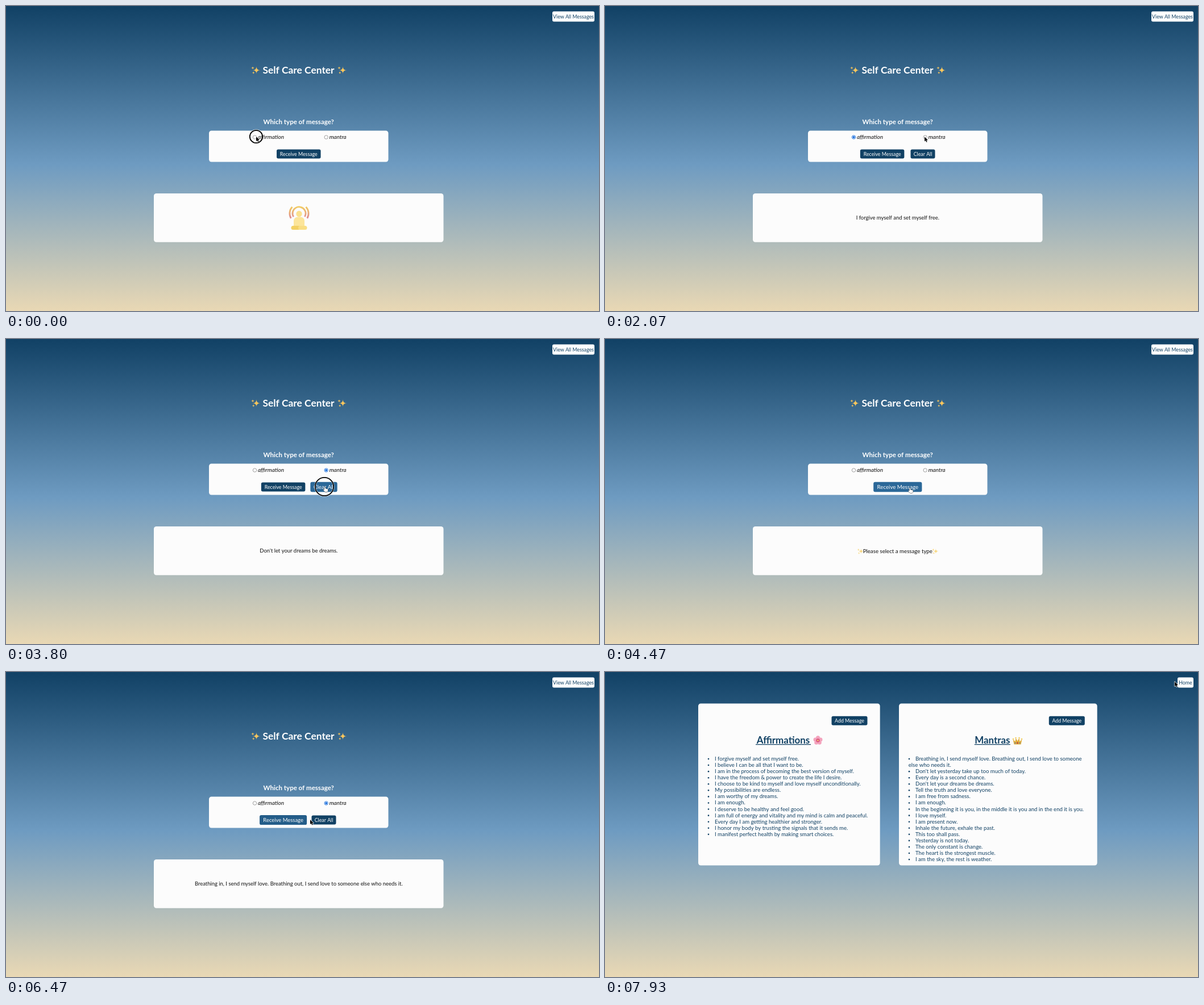
These frames come from a looping animation (1043 by 537 pixels, 8000 ms). An HTML page with a canvas:

```html
<!DOCTYPE html>
<html lang="en">
<head>
<meta charset="utf-8">
<title>Self Care Center</title>
<style>
  html, body { margin: 0; width: 100%; height: 100%; overflow: hidden; }
  body { background: linear-gradient(#114165, #6e9bc1 52%, #e9d8b4); }
  canvas { display: block; }
</style>
</head>
<body>
<canvas id="stage" width="1043" height="537"></canvas>
<script>
const ctx = document.getElementById('stage').getContext('2d');
const LOOP = 8000, LISTS_AT = 7870;
const NAVY = [17, 65, 100], BLUE = [43, 104, 152], WHITE = [255, 255, 255], CREAM = [250, 244, 231];
const LINK = [58, 120, 162], CARD = '#fcfcfc', INK = '#111';

// [time, x, y] of the pointer tip
const path = [
  [0, 440, 230], [270, 440, 230], [560, 484, 258], [1650, 484, 258], [2100, 563, 230],
  [2330, 563, 230], [2900, 519, 258], [3270, 519, 258], [3700, 560, 260], [4130, 560, 260],
  [4300, 535.5, 262], [4930, 535.5, 262], [5500, 563, 230], [5730, 563, 230],
  [6050, 535, 260], [6480, 535, 260], [7330, 1002, 17]
];
// [start, end, ring radius]
const clicks = [
  [0, 70, 12], [600, 670, 17], [1000, 1130, 17], [1530, 1600, 17], [2130, 2230, 12], [3000, 3070, 17],
  [3800, 3870, 17], [4330, 4400, 17], [5670, 5730, 12], [6330, 6400, 17], [7670, 7870, 17]
];
const hovers = {
  receive: [[480, 1740], [2720, 3430], [4200, 5060], [5900, 6400]],
  clear: [[3500, 3870]],
  view: [[7270, LISTS_AT]]
};
const ICON = 'icon', PROMPT = 'Please select a message type';
const messages = [
  [0, ICON], [670, 'I am in the process of becoming the best version of myself.'],
  [1070, 'My possibilities are endless.'], [1600, 'I forgive myself and set myself free.'],
  [3070, "Don't let your dreams be dreams."], [3870, ICON], [4400, PROMPT],
  [6400, 'Breathing in, I send myself love. Breathing out, I send love to someone else who needs it.']
];
const choices = [[0, ''], [70, 'affirmation'], [2230, 'mantra'], [3870, ''], [5730, 'mantra']];

const affirmations = [
  'I forgive myself and set myself free.', 'I believe I can be all that I want to be.',
  'I am in the process of becoming the best version of myself.',
  'I have the freedom & power to create the life I desire.',
  'I choose to be kind to myself and love myself unconditionally.',
  'My possibilities are endless.', 'I am worthy of my dreams.', 'I am enough.',
  'I deserve to be healthy and feel good.',
  'I am full of energy and vitality and my mind is calm and peaceful.',
  'Every day I am getting healthier and stronger.',
  'I honor my body by trusting the signals that it sends me.',
  'I manifest perfect health by making smart choices.'
];
const mantras = [
  'Breathing in, I send myself love. Breathing out, I send love to someone\nelse who needs it.',
  "Don't let yesterday take up too much of today.", 'Every day is a second chance.',
  "Don't let your dreams be dreams.", 'Tell the truth and love everyone.',
  'I am free from sadness.', 'I am enough.',
  'In the beginning it is you, in the middle it is you and in the end it is you.',
  'I love myself.', 'I am present now.', 'Inhale the future, exhale the past.',
  'This too shall pass.', 'Yesterday is not today.', 'The only constant is change.',
  'The heart is the strongest muscle.', 'I am the sky, the rest is weather.'
];

const clamp = v => Math.max(0, Math.min(1, v));
const ease = v => v * v * (3 - 2 * v);
const mix = (a, b, k) => `rgb(${a.map((v, i) => Math.round(v + (b[i] - v) * k))})`;
const latest = (list, t) => list.filter(e => e[0] <= t).pop()[1];

function pointer(t) {
  const i = path.findIndex(p => p[0] > t);
  if (i < 0) return path[path.length - 1].slice(1);
  const [t0, x0, y0] = path[i - 1], [t1, x1, y1] = path[i];
  const k = ease((t - t0) / (t1 - t0));
  return [x0 + (x1 - x0) * k, y0 + (y1 - y0) * k];
}

const hoverAmount = (name, t) => Math.max(...hovers[name].map(([on, off]) =>
  t < off ? clamp((t - on) / 250) : clamp(1 - (t - off) / 250)));
const isHovering = t => Object.values(hovers).flat().some(([on, off]) => t >= on && t < off);

function text(str, x, y, size, color = INK, style = '', align = 'center') {
  ctx.font = `${style} ${size}px Lato, sans-serif`;
  ctx.textAlign = align;
  ctx.fillStyle = color;
  ctx.fillText(str, x, y);
}

function box(x, y, w, h, r, color) {
  ctx.fillStyle = color;
  ctx.beginPath();
  ctx.roundRect(x, y, w, h, r);
  ctx.fill();
}

function disc(x, y, rx, ry, color) {
  ctx.fillStyle = color;
  ctx.beginPath();
  ctx.ellipse(x, y, rx, ry, 0, 0, 7);
  ctx.fill();
}

function circle(x, y, r, color, width) {
  ctx.strokeStyle = color;
  ctx.lineWidth = width;
  ctx.beginPath();
  ctx.arc(x, y, r, 0, 7);
  ctx.stroke();
}

function button(label, cx, cy, w, h, bg, fg, hover = 0) {
  ctx.save();
  ctx.translate(cx, cy);
  ctx.scale(1 + hover * 0.1, 1 + hover * 0.1);
  box(-w / 2, -h / 2, w, h, 2.7, bg);
  text(label, 0, 3.1, 8.8, fg);
  ctx.restore();
}

const navyButton = (label, cx, cy, w, hover = 0) =>
  button(label, cx, cy, w, 16, mix(NAVY, BLUE, hover), '#fff', hover);

function star(x, y, r, color) {
  ctx.fillStyle = color;
  ctx.beginPath();
  ctx.moveTo(x, y - r);
  for (let i = 1; i <= 4; i++) {
    const a = i * Math.PI / 2;
    ctx.quadraticCurveTo(x, y, x + r * Math.sin(a), y - r * Math.cos(a));
  }
  ctx.fill();
}

function sparkles(x, y, s, color) {
  star(x + 2 * s, y, 6.6 * s, color);
  star(x - 4.5 * s, y - 4 * s, 3.2 * s, color);
  star(x - 3.3 * s, y + 4.6 * s, 2.8 * s, color);
}

function radio(label, x, checked) {
  disc(x, 231, 3.5, 3.5, '#fff');
  circle(x, 231, 3.2, checked ? '#1b6fdc' : '#767676', checked ? 0.9 : 0.7);
  if (checked) disc(x, 231, 2, 2, '#1b6fdc');
  text(label, x + 5.5, 234, 10, INK, 'italic', 'left');
}

function meditator() {
  const glow = ctx.createLinearGradient(0, 352, 0, 375);
  glow.addColorStop(0, '#f2cf62');
  glow.addColorStop(0.4, '#ecb673');
  glow.addColorStop(1, '#dc8497');
  ctx.strokeStyle = glow;
  ctx.lineWidth = 2.8;
  for (const [r, from, to] of [[11.5, 2.6, 6.82], [16.6, 2.6, 3.9], [16.6, 5.52, 6.82]]) {
    ctx.beginPath();
    ctx.arc(515.5, 365.2, r, from, to);
    ctx.stroke();
  }
  disc(515.5, 366, 5.2, 5.4, '#fbe28e');
  box(506, 371.5, 19, 18, [7, 7, 2, 2], '#fce59a');
  box(501.5, 387, 16, 7, 3.5, '#f3d164');
  box(514, 387, 15.5, 7, 3.5, '#f9de84');
}

function homePage(t) {
  const view = hoverAmount('view', t), message = latest(messages, t);
  button('View All Messages', 998, 18.5, 74, 18, mix(WHITE, CREAM, view), mix(NAVY, LINK, view), view);
  text('Self Care Center', 514.5, 118.5, 17.4, '#fff', 'bold');
  sparkles(438.5, 113, 1, '#f9c65c');
  sparkles(590.5, 113, 1, '#f9c65c');
  text('Which type of message?', 514.7, 207.6, 11.5, '#fff', 'bold');

  box(357, 219.5, 315.5, 55, 4.5, CARD);
  const choice = latest(choices, t);
  radio('affirmation', 437.5, choice === 'affirmation');
  radio('mantra', 563.2, choice === 'mantra');
  const clearable = message !== ICON && message !== PROMPT;
  navyButton('Receive Message', clearable ? 487.6 : 514.8, 260.5, 77.5, hoverAmount('receive', t));
  if (clearable) navyButton('Clear All', 559, 260.5, 43, hoverAmount('clear', t));

  box(260, 330, 509.5, 85.7, 4.5, CARD);
  if (message === ICON) meditator();
  else if (message === PROMPT) {
    text(message, 514.8, 377, 9.7);
    sparkles(449, 373.7, 0.7, '#f8d882');
    sparkles(580.5, 373.7, 0.7, '#f8d882');
  } else text(message, 514.8, 376, 9.45);
}

function blossom(x, y) {
  for (let i = 0; i < 5; i++) {
    const a = i * Math.PI * 0.4 - Math.PI / 2;
    disc(x + 4.7 * Math.cos(a), y + 4.7 * Math.sin(a), 3.5, 3.5, '#f3a3bd');
  }
  disc(x, y, 3.2, 3.2, '#d9537f');
  disc(x, y, 1.3, 1.3, '#f5d66b');
}

function crown(x, y) {
  ctx.fillStyle = '#e0ad3c';
  ctx.beginPath();
  [[-6, 6], [-8, -3], [-4, 1], [-3, -5], [0, 0], [3, -5], [4, 1], [8, -3], [6, 6]]
    .forEach(([dx, dy]) => ctx.lineTo(x + dx, y + dy));
  ctx.fill();
  for (const [dx, dy] of [[-7.5, -3.5], [-3, -5.5], [3, -5.5], [7.5, -3.5]])
    disc(x + dx, y + dy, 1.3, 1.3, '#f4cf63');
  disc(x, y + 3.5, 1.4, 1.4, '#b8433f');
  disc(x - 4, y + 3.5, 1, 1, '#4d7fb5');
  disc(x + 4, y + 3.5, 1, 1, '#4d7fb5');
}

function listCard(title, x, w, titleX, titleW, addX, lines) {
  const navy = mix(NAVY, NAVY, 0);
  box(x, 55.5, w, 285, 4.5, CARD);
  navyButton('Add Message', addX, 85.8, 63);
  text(title, titleX, 125.7, 16.9, navy, 'bold');
  box(titleX - titleW / 2, 127, titleW, 1.2, 0, navy);
  let y = 156;
  for (const line of lines) {
    disc(x + 18, y - 3, 1.3, 1.3, navy);
    line.split('\n').forEach((part, i) => {
      text(part, x + (i ? 16.8 : 29), y, 9.55, navy, '', 'left');
      y += 11.07;
    });
  }
}

function listPage() {
  button('Home', 1021, 18.5, 28, 18, '#fff', mix(NAVY, NAVY, 0));
  listCard('Affirmations', 164, 319.7, 313.5, 97, 430, affirmations);
  listCard('Mantras', 517, 348.7, 681.3, 63, 812.3, mantras);
  blossom(374.5, 120.5);
  crown(725.5, 121.5);
}

const ARROW = new Path2D('M0 0V8.2L1.9 6.5L3.2 9.4L4.6 8.8L3.4 6H6Z');
const HAND = new Path2D('M0 .8Q.9 -.4 1.7 .8V3.6Q2.6 3 3.3 3.8Q4.2 3.4 4.8 4.2' +
  'Q6.2 3.8 6.2 5.4Q6.2 7.6 5.2 9H.9Q-.6 7.2 -2 5.4Q-1.6 4.2 0 5.4Z');

function cursor(t) {
  const [x, y] = pointer(t), hand = isHovering(t), shape = hand ? HAND : ARROW;
  ctx.save();
  ctx.translate(x, y);
  ctx.lineJoin = 'round';
  ctx.lineWidth = hand ? 0.9 : 1.2;
  ctx.strokeStyle = hand ? INK : '#fff';
  ctx.fillStyle = hand ? '#fff' : '#000';
  ctx.stroke(shape);
  ctx.fill(shape);
  ctx.restore();
  const click = clicks.find(([from, to]) => t >= from && t < to);
  if (click) {
    circle(x, y, click[2] - 0.8, 'rgba(255,255,255,.8)', 3);
    circle(x, y, click[2] - 0.8, '#000', 1.8);
  }
}

function frame(now) {
  const t = now % LOOP;
  ctx.clearRect(0, 0, 1043, 537);
  t < LISTS_AT ? homePage(t) : listPage();
  cursor(t);
  requestAnimationFrame(frame);
}
requestAnimationFrame(frame);
</script>
</body>
</html>
```
